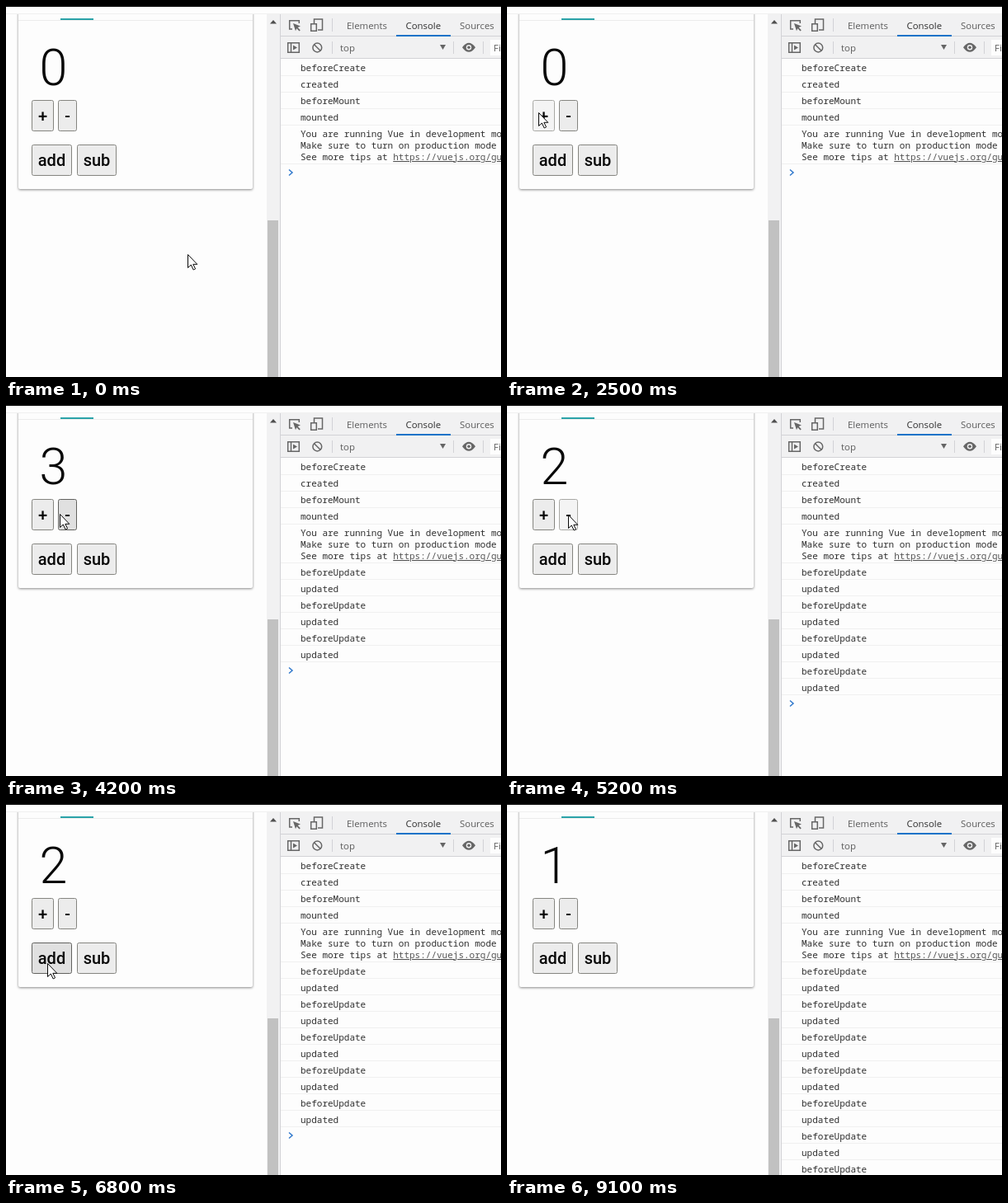
These frames come from a looping animation (600 by 450 pixels, 10 s). An HTML page:

```html
<!DOCTYPE html>
<html lang="en">
<head>
<meta charset="utf-8">
<title>Lifecycle hooks</title>
<style>
  html, body { margin: 0; width: 100%; height: 100%; overflow: hidden; background: #fdfdfd; }
  svg { display: block; width: 600px; height: 450px; }
  text { white-space: pre; }
  .page { fill: #fdfdfd; }
  .card { fill: #fdfdfd; filter: drop-shadow(0 1px 1.5px #0007); }
  .bar { fill: #f1f1f2; }
  .rule { fill: #d2d2d6; }
  .count { font: 300 61px Roboto, sans-serif; fill: #080808; }
  .button rect { fill: #ececec; stroke: #858580; }
  .button text { font: 500 20px Roboto, sans-serif; text-anchor: middle; fill: #080808; }
  .button.hover rect { fill: #e0e0e0; stroke: #62625f; }
  .button.active rect { fill: #f4f4f4; stroke: #a9a9a5; }
  .tab { font: 11.4px "Open Sans", sans-serif; fill: #5c5c5c; }
  .tab.on { fill: #303030; }
  .log { font: 11px "Noto Sans Mono", monospace; fill: #303030; }
  .link { fill: #555; text-decoration: underline; }
  .line { fill: #f0f0f0; }
  .icon { fill: none; stroke: #666; stroke-width: 1.5; }
  .solid { fill: #666; }
</style>
</head>
<body>
<svg viewBox="0 0 600 450">
  <rect class="page" width="600" height="450"/>
  <rect class="card" x="15" y="-10" width="284" height="232" rx="2"/>
  <rect x="15" y="17" width="284" height="1" fill="#ececec"/>
  <rect x="66" y="15" width="40" height="2" fill="#2aa3a8"/>
  <text class="count" id="count" x="40.5" y="96">0</text>
  <g id="buttons"></g>

  <rect class="bar" x="316" y="10" width="16" height="440"/>
  <rect x="317" y="260" width="13" height="190" fill="#c1c1c1"/>
  <path d="M320 21.5h8l-4-4.5z" fill="#505050"/>

  <rect class="page" x="333" y="10" width="267" height="440"/>
  <rect class="bar" x="333" y="10" width="267" height="54"/>
  <rect class="rule" x="332" y="10" width="1" height="440"/>
  <rect class="rule" x="333" y="36" width="267" height="1"/>
  <rect class="rule" x="333" y="63" width="267" height="1"/>
  <rect x="473" y="35" width="66" height="2" fill="#1a73c8"/>
  <g class="rule">
    <rect x="395" y="15" width="1" height="16"/>
    <rect x="395" y="43" width="1" height="15"/>
    <rect x="542" y="43" width="1" height="15"/>
    <rect x="578" y="43" width="1" height="15"/>
  </g>
  <rect class="page" x="587" y="41" width="13" height="19"/>

  <g class="icon">
    <path d="M347 28h-3.3V17.7h11.6V21"/>
    <path d="M373.5 21v-5h10v13H378M369.7 21.7h6.6v8.6h-6.6z"/>
    <path d="M341.7 44.7h13.6v11.6h-13.6zM345.5 45v11"/>
    <circle cx="377.3" cy="50.5" r="5.4"/>
    <path d="M373.5 46.7l7.6 7.6"/>
  </g>
  <g class="solid">
    <path d="M348 21l9 3.6-3.4 1.4 3.2 3.2-1.3 1.3-3.2-3.2-1.3 3z"/>
    <path d="M348 47.5l5 3-5 3z"/>
    <path d="M526 47h7l-3.5 6z"/>
    <path d="M553 50.3q8-11 16 0q-8 11-16 0z"/>
  </g>
  <circle cx="561" cy="50.3" r="3.2" fill="#f1f1f2"/>
  <circle class="solid" cx="561" cy="50.3" r="1.8"/>

  <text class="tab" x="413" y="28">Elements</text>
  <text class="tab on" x="484.5" y="28">Console</text>
  <text class="tab" x="550" y="28">Sources</text>
  <text class="tab" x="405" y="55">top</text>
  <text class="tab" x="591" y="55">Filter</text>

  <g id="logs"></g>
  <path id="prompt" d="M343 198.5l4 3.5-4 3.5" fill="none" stroke="#2f78cc" stroke-width="1.5"/>

  <rect class="page" width="600" height="10"/>
  <rect width="600" height="1" fill="#080808"/>
  <rect class="line" y="9" width="600" height="1"/>
  <path id="cursor" d="M.5.5v16l3.8-3.5 2.9 6 2.4-1.2-2.8-5.5h5z" fill="#fdfdfd" stroke="#080808"/>
</svg>
<script>
const LOOP = 10000, STEP = 100;
const $ = id => document.getElementById(id);

function add(parent, tag, attrs, text = '') {
  const node = document.createElementNS('http://www.w3.org/2000/svg', tag);
  for (const key in attrs) node.setAttribute(key, attrs[key]);
  node.textContent = text;
  return parent.appendChild(node);
}

const buttons = [
  ['+', 31, 114, 27], ['-', 63, 114, 23], ['add', 31, 168, 49], ['sub', 86, 168, 48]
].map(([label, x, y, w]) => {
  const node = add($('buttons'), 'g', { class: 'button' });
  add(node, 'rect', { x: x + .5, y: y + .5, width: w - 1, height: 37, rx: 2 });
  add(node, 'text', { x: x + w / 2, y: y + 26 }, label);
  return { node, x, y, w };
});

function logRow(parent, baseline, text) {
  return add(parent, 'text', { class: 'log', x: 357, y: baseline }, text);
}
function separator(parent, y) {
  add(parent, 'rect', { class: 'line', x: 333, y, width: 267, height: 1 });
}

['beforeCreate', 'created', 'beforeMount', 'mounted'].forEach((hook, i) => {
  logRow($('logs'), 79 + 20 * i, hook);
  separator($('logs'), 84 + 20 * i);
});
['You are running Vue in development mode.',
 'Make sure to turn on production mode when deploying for production.',
 'See more tips at '].forEach((tip, i) => logRow($('logs'), 159 + 14 * i, tip));
add($('logs').lastChild, 'tspan', { class: 'link' }, 'https://vuejs.org/guide/deployment.html');
separator($('logs'), 191);

// Each click: press, release (value changes), then the hooks are logged.
const clicks = [
  { press: 2500, release: 2600, value: 1 },
  { press: 2900, release: 3000, value: 2 },
  { press: 3800, release: 3900, value: 3 },
  { press: 4700, release: 4800, value: 2 },
  { press: 5200, release: 5300, value: 1 },
  { press: 6500, release: 6800, value: 2 },
  { press: 7800, release: 7900, value: 1 }
];
clicks.forEach((click, i) => {
  click.rows = add($('logs'), 'g', {});
  ['beforeUpdate', 'updated'].forEach((hook, j) => {
    const top = 192 + 40 * i + 20 * j;
    logRow(click.rows, top + 15, hook);
    separator(click.rows, top + 19);
  });
});

// Pointer stops: time, x, y
const path = [
  [0, 220, 301], [200, 220, 301], [300, 218, 301], [1100, 218, 301], [1300, 200, 300],
  [2100, 38, 129], [4000, 38, 129], [4200, 65, 132], [4500, 74, 133], [6000, 74, 133],
  [6400, 50, 193], [6900, 50, 193], [7400, 96, 190], [7500, 96, 190], [7700, 102, 191],
  [8000, 102, 191], [8600, 514, 420], [8700, 526, 438], [8800, 532, 460], [LOOP, 532, 460]
];

function pointer(t) {
  const i = path.findIndex(stop => stop[0] > t);
  const [t0, x0, y0] = path[i - 1], [t1, x1, y1] = path[i];
  const p = (t - t0) / (t1 - t0), ease = p * p * (3 - 2 * p);
  return [x0 + (x1 - x0) * ease, y0 + (y1 - y0) * ease].map(Math.round);
}

function draw(now) {
  const t = Math.floor(now % LOOP / STEP) * STEP;
  const [x, y] = pointer(t);
  $('cursor').setAttribute('transform', `translate(${x} ${y})`);

  let value = 0, logged = 0, pressed = false;
  for (const click of clicks) {
    const shown = t >= click.release + STEP;
    click.rows.style.display = shown ? '' : 'none';
    logged += shown;
    if (t >= click.release) value = click.value;
    if (t >= click.press && t < click.release) pressed = true;
  }
  $('count').textContent = value;
  $('prompt').setAttribute('transform', `translate(0 ${40 * logged})`);

  for (const b of buttons) {
    const over = x >= b.x && x < b.x + b.w && y >= b.y && y < b.y + 38;
    b.node.setAttribute('class', 'button' + (over ? pressed ? ' active' : ' hover' : ''));
  }
}

function tick(now) {
  draw(now);
  requestAnimationFrame(tick);
}
draw(0);
requestAnimationFrame(tick);
</script>
</body>
</html>
```
